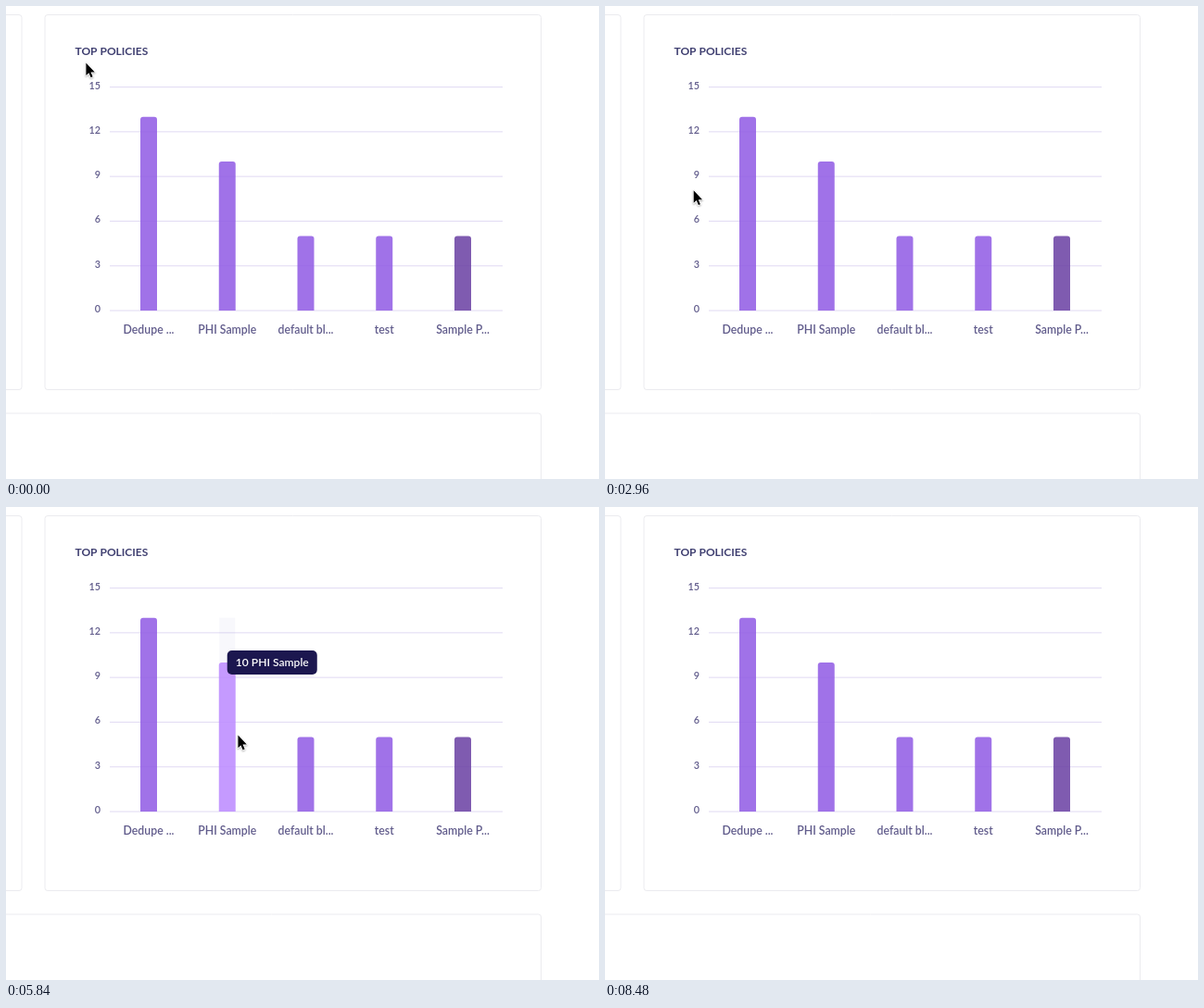
Animation, 640 px wide and 511 px high, one loop 8800 ms. Source, as an HTML page with a canvas:

```html
<!DOCTYPE html>
<html lang="en">
<head>
<meta charset="utf-8">
<title>Top policies</title>
<style>
  html, body { margin: 0; width: 100%; height: 100%; overflow: hidden; background: #fff; }
  canvas { display: block; width: 640px; height: 511px; }
</style>
</head>
<body>
<canvas id="stage"></canvas>
<script>
const W = 640, H = 511, LOOP = 8800, STEP = 80, FADE = 400;
const canvas = document.getElementById('stage');
const ctx = canvas.getContext('2d');
const ratio = window.devicePixelRatio || 1;
canvas.width = W * ratio;
canvas.height = H * ratio;

const FONT = 'Lato, "Open Sans", sans-serif';
const BASE = 329, UNIT = 16.1, BAR_W = 18, TIP_H = 26;
const INK = '#605b8b';

const bars = [
  { value: 13, label: 'Dedupe ...', name: 'Dedupe Masking' },
  { value: 10, label: 'PHI Sample', name: 'PHI Sample' },
  { value: 5, label: 'default bl...', name: 'default blurn' },
  { value: 5, label: 'test', name: 'test' },
  { value: 5, label: 'Sample P...', name: 'Sample PCI Policy', dark: true, flip: true }
].map((bar, i) => ({ ...bar, x: 154 + i * 84.75, y: BASE - bar.value * UNIT }));

// Pointer strokes; the pointer rests between them. A bend makes the stroke a curve.
const home = [86, 61];
const strokes = [
  { from: 0, till: 240, to: [74, 44] },
  { from: 320, till: 720, to: [166, 58] },
  { from: 800, till: 960, to: [43, 290] },
  { from: 960, till: 1040, to: [118, 388] },
  { from: 1040, till: 1280, to: [146, 350] },
  { from: 1360, till: 1600, to: [221, 353] },
  { from: 1680, till: 2160, to: [482, 353] },
  { from: 2240, till: 2640, to: [103, 111] },
  { from: 2720, till: 3280, to: [85, 316] },
  { from: 3280, till: 3680, to: [151, 156] },
  { from: 4640, till: 4880, to: [235, 189] },
  { from: 5760, till: 6240, to: [327, 288], bend: [280, 385] },
  { from: 6960, till: 7440, to: [490, 290] },
  { from: 7680, till: 7840, to: [466, 278] },
  { from: 7840, till: 8400, to: [420, 485] }
];
const GONE = 8480;

const visits = [
  { bar: bars[0], enter: 3565, leave: 4761 },
  { bar: bars[1], enter: 4869, leave: 5850 },
  { bar: bars[2], enter: 5930, leave: 7060 },
  { bar: bars[4], enter: 7120, leave: 7835 }
];

const clamp = p => Math.max(0, Math.min(1, p));
const mix = (a, b, k) => a + (b - a) * k;
const easeOutQuart = p => 1 - (1 - clamp(p)) ** 4;

function pointerAt(t) {
  let pos = home;
  for (const { from, till, to, bend } of strokes) {
    if (t < from) break;
    const k = clamp((t - from) / (till - from));
    pos = pos.map((a, i) => {
      const mid = bend ? bend[i] : mix(a, to[i], 0.5);
      return mix(mix(a, mid, k), mix(mid, to[i], k), k);
    });
  }
  return pos;
}

function setFont(size, weight = 600) {
  ctx.font = `${weight} ${size}px ${FONT}`;
}

function text(str, x, y, size, color, align = 'left', weight = 600) {
  setFont(size, weight);
  ctx.fillStyle = color;
  ctx.textAlign = align;
  ctx.fillText(str, x, y);
}

const tipText = bar => `${bar.value} ${bar.name}`;

function tipWidth(bar) {
  setFont(12.1);
  return ctx.measureText(tipText(bar)).width + 18;
}

// The tooltip glides from the last bar while it is still fading out
function tipAt(t) {
  const tip = { x: 0, y: 0, alpha: 0 };
  visits.forEach(({ bar, enter, leave }, i) => {
    if (t < enter) return;
    const next = visits[i + 1];
    const end = next ? Math.min(t, next.enter) : t;
    const k = easeOutQuart((Math.min(t, leave) - enter) / FADE);
    const x = bar.flip ? bar.x - tipWidth(bar) : bar.x;
    tip.x = tip.bar ? mix(tip.x, x, k) : x;
    tip.y = tip.bar ? mix(tip.y, bar.y, k) : bar.y;
    tip.alpha = mix(tip.alpha, 1, k) * (1 - easeOutQuart((end - leave) / FADE));
    tip.bar = bar;
    tip.hover = t < leave;
  });
  return tip;
}

function roundRect(x, y, w, h, r) {
  ctx.beginPath();
  ctx.roundRect(x, y, w, h, r);
}

function drawCard(x, y, w, h) {
  ctx.strokeStyle = '#ebebef';
  ctx.lineWidth = 1;
  roundRect(x, y, w, h, 3);
  ctx.stroke();
}

function drawAxes() {
  text('TOP POLICIES', 74.5, 53, 12, '#414172', 'left', 700);
  for (let v = 0; v <= 15; v += 3) {
    const y = BASE - v * UNIT;
    ctx.fillStyle = '#e3ddf4';
    ctx.fillRect(112, y - 0.5, 424, 1.1);
    text(v, 102, y + 2, 10.8, INK, 'right');
  }
  for (const { label, x } of bars) text(label, x, 354, 12.3, INK, 'center');
}

function drawBars(tip) {
  if (tip.bar) {
    ctx.fillStyle = `rgba(90,80,170,${0.04 * tip.alpha ** 2})`;
    ctx.fillRect(tip.bar.x - 8.5, bars[0].y, 17, tip.bar.y - bars[0].y);
  }
  for (const bar of bars) {
    const lit = tip.hover && tip.bar === bar;
    ctx.fillStyle = lit ? 'rgba(190,141,255,.88)'
      : bar.dark ? 'rgba(110,69,165,.88)' : 'rgba(147,95,229,.88)';
    roundRect(bar.x - BAR_W / 2, bar.y, BAR_W, BASE - bar.y, [3, 3, 0, 0]);
    ctx.fill();
  }
}

function drawTip({ x, y, alpha, bar }) {
  if (alpha < 0.005) return;
  ctx.globalAlpha = alpha;
  ctx.fillStyle = '#1c174f';
  roundRect(x, y - TIP_H / 2, tipWidth(bar), TIP_H, 5);
  ctx.fill();
  ctx.globalAlpha = 1;
  text(tipText(bar), x + 9, y + 4, 12.1, '#fff');
}

const arrow = new Path2D('M0 0V13.6L3 10.8L5.2 15.8L7.2 14.9L5.1 10H9.4Z');

function drawPointer(x, y) {
  ctx.save();
  ctx.translate(x + 0.4, y + 0.4);
  ctx.lineJoin = 'round';
  ctx.lineWidth = 1.7;
  ctx.strokeStyle = '#fff';
  ctx.shadowColor = 'rgba(0,0,0,.3)';
  ctx.shadowBlur = 2 * ratio;
  ctx.shadowOffsetY = ratio;
  ctx.stroke(arrow);
  ctx.shadowColor = 'transparent';
  ctx.fillStyle = '#000';
  ctx.fill(arrow);
  ctx.restore();
}

function draw(t) {
  ctx.setTransform(ratio, 0, 0, ratio, 0, 0);
  ctx.fillStyle = '#fff';
  ctx.fillRect(0, 0, W, H);
  const tip = tipAt(t);
  drawCard(-20, 9.5, 37, 405);
  drawCard(42, 9.5, 535.5, 405);
  drawCard(-20, 440, 597.5, 100);
  drawAxes();
  drawBars(tip);
  drawTip(tip);
  if (t < GONE) drawPointer(...pointerAt(t));
}

const begin = performance.now();
function frame() {
  const t = (performance.now() - begin) % LOOP;
  draw(Math.floor(t / STEP) * STEP);
  requestAnimationFrame(frame);
}
frame();
</script>
</body>
</html>
```
